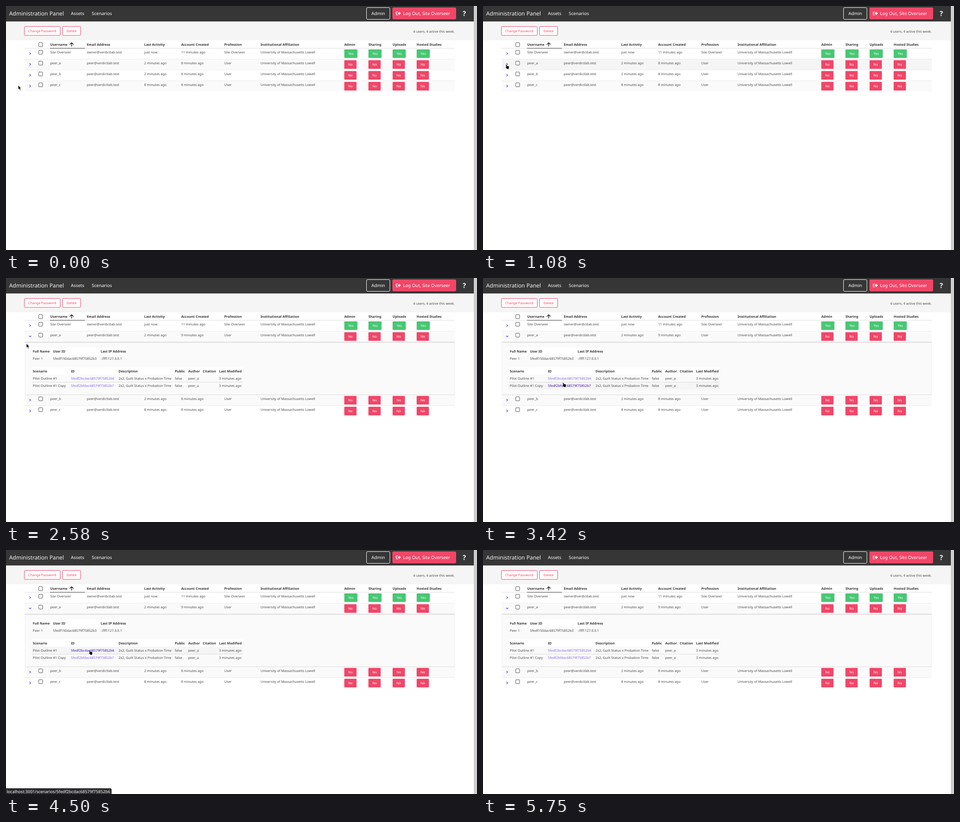
An HTML page that plays this animation: 1038 by 540 pixels, repeating every 6.08 s.

```html
<!DOCTYPE html>
<html lang="en">
<head>
<meta charset="utf-8">
<title>Administration Panel</title>
<style>
  html, body { margin: 0; width: 100%; height: 100%; overflow: hidden; background: #fff; }
  svg { display: block; width: 1038px; height: 540px; }
  text { font: 7.37px "Noto Sans", sans-serif; fill: #4a4a4a; text-rendering: geometricPrecision; white-space: pre; }
  .head { font-weight: 600; fill: #363636; }
  .nav { font-size: 9.83px; fill: #fff; }
  .title { font-size: 12.29px; fill: #f5f5f5; }
  .help { font-size: 15px; font-weight: 700; fill: #fff; }
  .tag { fill: #fff; }
  .danger { fill: #f14668; }
  .link { fill: #8c67ef; }
  .link.on { fill: #3d0ab8; }
  .url { font-size: 9.13px; fill: #f9f9fa; }
  .rule { stroke: #dbdbdb; }
  .icon { fill: none; stroke-linecap: round; stroke-linejoin: round; }
</style>
</head>
<body>
<svg id="stage" viewBox="0 0 1038 540"></svg>
<script>
const LOOP = 6080;
const EXPAND_AT = 1500;
const ROW = 24;
const TOP = 93.5;
const DETAIL = 117;
const COLS = [97.5, 178, 304.5, 386, 481, 561, 745.5, 798.7, 852, 905];
const HEADS = ['Username', 'Email Address', 'Last Activity', 'Account Created', 'Profession',
  'Institutional Affiliation', 'Admin', 'Sharing', 'Uploads', 'Hosted Studies'];
const SCHOOL = 'University of Massachusetts Lowell';
const MAIL = 'peer@verdictlab.test';
const USERS = [
  ['Site Overseer', 'owner@verdictlab.test', 'just now', '11 minutes ago', 'Site Overseer', SCHOOL],
  ['peer_a', MAIL, '2 minutes ago', '8 minutes ago', 'User', SCHOOL],
  ['peer_b', MAIL, '2 minutes ago', '8 minutes ago', 'User', SCHOOL],
  ['peer_c', MAIL, '8 minutes ago', '8 minutes ago', 'User', SCHOOL],
];

// Pointer stops: time, x, y, and 1 for the hand shape.
const POINTER = [
  [0, 27, 175.5, 0], [80, 48, 203, 0], [170, 82, 227, 0], [250, 116, 235, 0], [330, 126, 230, 0],
  [420, 118, 205, 0], [500, 100, 175, 0], [580, 82, 150, 0], [670, 68, 138, 0],
  [750, 62, 137, 0], [830, 54, 134, 1], [920, 47, 131, 1], [1000, 45, 130, 1], [1080, 50, 129.5, 1],
  [2500, 46, 133, 0], [2580, 45, 145, 0], [2670, 53, 162, 0], [2750, 67, 183, 0], [2830, 85, 203, 0],
  [2920, 103, 219, 0], [3000, 117, 229, 0], [3080, 125, 233, 0], [3170, 128, 231, 0], [3250, 132, 229.5, 0],
  [3420, 175.5, 231.5, 1], [3670, 181, 225, 1], [3830, 183, 222, 1], [5330, 110, 118.5, 0],
];

const text = (x, y, str, cls = '', attrs = '') => `<text x="${x}" y="${y}" class="${cls}" ${attrs}>${str}</text>`;
const centered = (x, y, str, cls) => text(x, y, str, cls, 'text-anchor="middle"');
const rect = (x, y, w, h, fill, attrs = '') => `<rect x="${x}" y="${y}" width="${w}" height="${h}" fill="${fill}" ${attrs}/>`;
const rule = (x1, x2, y) => `<path class="rule" d="M${x1} ${y}H${x2}"/>`;
const icon = (d, color, width, attrs = '') => `<path class="icon" d="${d}" stroke="${color}" stroke-width="${width}" ${attrs}/>`;
const checkbox = y => rect(72.1, y - 4.3, 8.6, 8.6, '#fff', 'rx="1.8" stroke="#707070" stroke-width="1.2"');
const cells = (xs, y, words, cls) => words.map((w, i) => text(xs[i], y, w, cls)).join('');

function tag(x, y, yes) {
  const w = yes ? 29 : 27;
  return rect(x, y + 2.5, w, 19, yes ? '#48c774' : '#f14668', 'rx="1.3"') +
    centered(x + w / 2, y + 14.8, yes ? 'Yes' : 'No', 'tag');
}

function userRow(user, i) {
  const y = TOP + i * ROW;
  return `<g id="row${i}">` + rect(41.5, y, 947.5, ROW, '#fff', `id="bg${i}"`) +
    `<g transform="translate(53.2 ${y + 11.7})">` +
    icon('M-1.1 -2.2L1.1 0L-1.1 2.2', '#3f2fe6', 1.1, `id="chevron${i}"`) + '</g>' +
    checkbox(y + 8.9) +
    user.map((w, c) => text(COLS[c], y + 11.1, w, '', `id="cell${i}-${c}"`)).join('') +
    COLS.slice(6).map(x => tag(x, y, i === 0)).join('') +
    (i < 3 ? rule(41.5, 989, y + ROW) : '') + '</g>';
}

function detail() {
  const idCols = [59, 103.5, 208.5];
  const cols = [59, 143, 248, 372, 401.5, 433.5, 469.5];
  const scenario = (i, name, id) => {
    const y = 224.9 + i * 16.3;
    return rect(57, y - 10.7, 465, 16.3, '#fafafa', `id="scene${i}"`) +
      text(cols[0], y, name) + text(cols[1], y, id, 'link', `id="link${i}"`) +
      cells(cols.slice(2), y, ['2x2, Guilt Status x Probation Time', 'false', 'peer_a', '', '3 minutes ago']);
  };
  return '<g id="detail">' + rect(41.5, 141.5, 947.5, DETAIL, '#fafafa') +
    rect(41.5, 141.5, 947.5, 2.6, 'url(#shade)') +
    rect(41.5, 142, 1, DETAIL - 1, '#eee') + rect(988, 142, 1, DETAIL - 1, '#eee') +
    rect(57, 154, 210, 16.5, '#fff') + rect(57, 197.5, 465, 16.5, '#fff') +
    cells(idCols, 165, ['Full Name', 'User ID', 'Last IP Address'], 'head') +
    cells(idCols, 181.3, ['Peer 1', '5fedf150dac68579f75852b3', '::ffff:127.0.0.1']) +
    cells(cols, 208.6, ['Scenario', 'ID', 'Description', 'Public', 'Author', 'Citation', 'Last Modified'], 'head') +
    scenario(0, 'Pilot Outline #1', '5fedf2bcdac68579f75852b6') +
    scenario(1, 'Pilot Outline #1 Copy', '5fedf2bfdac68579f75852b7') +
    rule(57, 522, 230.5) + rule(41.5, 989, 258.5) + '</g>';
}

const navbar =
  rect(0, 0, 1031, 34.5, '#363636') +
  text(7, 21.2, 'Administration Panel', 'title') +
  text(143, 19.8, 'Assets', 'nav') + text(189, 19.8, 'Scenarios', 'nav') +
  rect(794.5, 3.5, 51.5, 26, 'none', 'rx="2.4" stroke="#fff"') + centered(820.2, 20, 'Admin', 'nav') +
  rect(851.5, 3.3, 140.5, 26.2, '#f14668', 'rx="2.4"') +
  icon('M863 12.8H861.2Q860.2 12.8 860.2 13.8V18.8Q860.2 19.8 861.2 19.8H863', '#fff', 1.3) +
  '<path fill="#fff" d="M863.3 14.9H866V12.2L870.2 16.3L866 20.4V17.7H863.3Z"/>' +
  text(875, 20, 'Log Out, Site Overseer', 'nav') +
  centered(1010.2, 21.6, '?', 'help');

const toolbar =
  rect(0, 34.5, 1031, 41.5, '#f5f5f5') +
  [[40.5, 79, 'Change Password'], [124.5, 40, 'Delete']].map(([x, w, label]) =>
    rect(x, 45.5, w, 19.5, '#fff', 'rx="1.3" stroke="#f14668"') + centered(x + w / 2, 58.2, label, 'danger')).join('') +
  text(989, 58.7, '4 users, 4 active this week.', '', 'text-anchor="end"');

const tableHead =
  checkbox(85.5) + cells(COLS, 87.9, HEADS, 'head') +
  icon('M144.7 89.2V81.2M140.8 85.1L144.7 81.2L148.6 85.1', '#222', 1.4);

const statusBar = '<g id="status">' +
  '<path d="M-1 541V527.5H229.5Q232.5 527.5 232.5 530.5V541Z" fill="#2a2a2e" stroke="#55555a" stroke-width=".7"/>' +
  text(1.7, 538.4, 'localhost:3001/scenarios/5fedf2bcdac68579f75852b6', 'url') + '</g>';

const pointers =
  '<path id="arrow" d="M0 0V9.6L2.2 7.6L3.8 11.3L5.5 10.5L3.9 7H6.7Z" fill="#000" stroke="#fff" stroke-width=".7"/>' +
  '<path id="hand" d="M.6 .2Q1.7 -.3 2.1 .8L2.7 3L6.1 3.5Q7.6 3.8 7.5 5.3L7 8.2V10H2.5L2.3 8.9L-.3 6.5Q-.8 5.6 .2 5.3L1.3 5.8L.1 1.3Q0 .5 .6 .2Z" fill="#000" stroke="#fff" stroke-width=".5"/>';

document.getElementById('stage').innerHTML =
  '<defs><linearGradient id="shade" x2="0" y2="1"><stop stop-color="#d2d2d2"/><stop offset="1" stop-color="#fafafa"/></linearGradient></defs>' +
  rect(0, 0, 1038, 540, '#fff') + navbar + toolbar + tableHead +
  USERS.map(userRow).join('') + detail() +
  rule(41.5, 989, TOP) + icon('M97.5 93.5H173.5', '#363636', 1.2) +
  rect(1031, 0, 7, 540, '#cdcdcd') + statusBar + pointers;

const $ = id => document.getElementById(id);
const show = (id, on) => $(id).setAttribute('visibility', on ? 'visible' : 'hidden');
const within = (t, from, to) => t >= from && t < to;

function statusOpacity(t) {
  if (within(t, 3920, 4170)) return 0.8;
  if (within(t, 4170, 5500)) return 1;
  return within(t, 5500, 5750) ? 0.5 : 0;
}

function draw(t) {
  const open = t >= EXPAND_AT;
  const [, x, y, hand] = POINTER.findLast(stop => t >= stop[0]);
  const present = t < 5500;

  show('detail', open);
  $('cell1-3').textContent = open ? '9 minutes ago' : '8 minutes ago';
  const turn = Math.min(Math.max((t - EXPAND_AT) / 160, 0), 1) * 90;
  $('chevron1').setAttribute('transform', `rotate(${turn})`);

  USERS.forEach((_, i) => {
    const shift = open && i > 1 ? DETAIL : 0;
    const top = TOP + i * ROW + shift;
    const hover = present && x > 41.5 && within(y, top, top + ROW);
    const striped = open && i > 1 ? i === 2 : i % 2 === 1;
    $('row' + i).setAttribute('transform', `translate(0 ${shift})`);
    $('bg' + i).setAttribute('fill', striped ? (hover ? '#f5f5f5' : '#fafafa') : hover ? '#fafafa' : '#fff');
  });

  const hovered = [within(t, 3830, 5330), within(t, 3420, 3670)];
  hovered.forEach((on, i) => {
    $('link' + i).classList.toggle('on', on);
    $('scene' + i).setAttribute('fill', on ? '#f5f5f5' : '#fafafa');
  });

  $('status').setAttribute('opacity', statusOpacity(t));
  show('arrow', present && !hand);
  show('hand', present && hand);
  $(hand ? 'hand' : 'arrow').setAttribute('transform', `translate(${x} ${y})`);
}

const start = performance.now();
function tick() {
  draw((performance.now() - start) % LOOP);
  requestAnimationFrame(tick);
}
tick();
</script>
</body>
</html>
```
